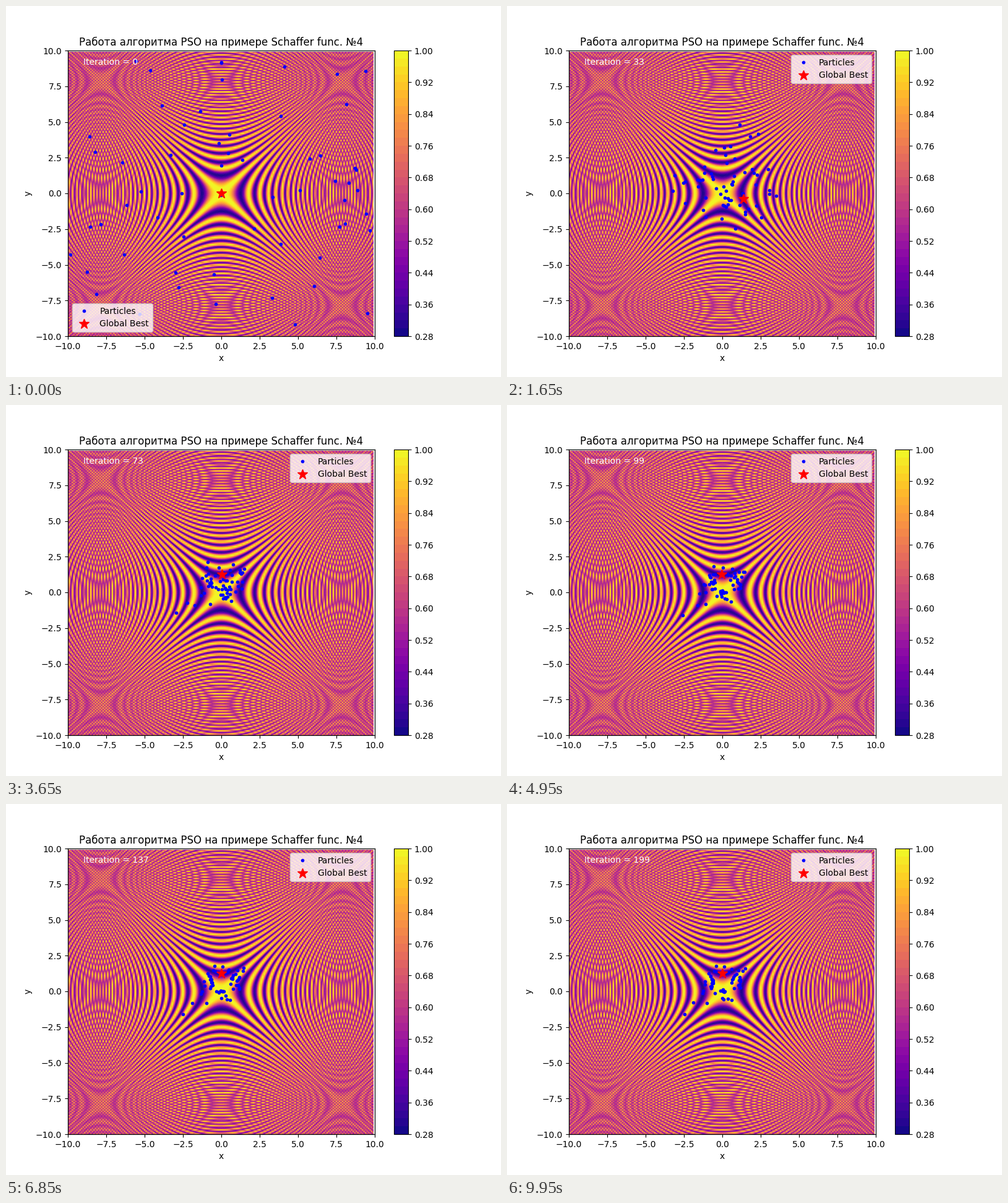
Recreate the animation shown at these times as a matplotlib script. Size 800 by 600 pixels, loop 10000 ms.

```python
import numpy as np
import matplotlib.pyplot as plt
from matplotlib.animation import FuncAnimation

plt.rcParams["font.family"] = "DejaVu Sans"

STEPS = 200
COUNT = 60
LEGEND_MOVE = 8  # iteration at which the upper right corner is free
AXES_BOX = (0.125, 0.11, 0.62, 0.77)
VALLEY = np.sqrt(np.pi / 2)  # distance of the deepest valley from the centre

# First iteration and place of each global best
BESTS = [(0, (0, 0)), (1, (1.36, -0.4)), (45, (0.03, 1.27)),
         (85, (-0.03, 1.25)), (105, (0, VALLEY))]


def schaffer4(x, y):
    top = np.cos(np.sin(np.abs(x**2 - y**2)))**2 - 0.5
    return 0.5 + top / (1 + 0.001 * (x**2 + y**2))**2


def draw_background(fig):
    """Render the static plot once and return it as an image."""
    ax = fig.add_subplot()
    axis = np.arange(-10, 10, 0.1)
    x, y = np.meshgrid(axis, axis)
    levels = np.linspace(0.28, 1, 37)
    field = ax.contourf(x, y, schaffer4(x, y), levels=levels, cmap="plasma")
    fig.colorbar(field, ax=ax, ticks=levels[::4], format="%.2f")
    ax.set(xlim=(-10, 10), ylim=(-10, 10), xlabel="x", ylabel="y",
           title="Работа алгоритма PSO на примере Schaffer func. №4")
    fig.canvas.draw()
    image = np.array(fig.canvas.buffer_rgba())
    fig.clear()
    return image


def valley_points(rng):
    """Personal bests, spread over the arms of the two inner valleys."""
    radius = VALLEY * rng.choice([1, np.sqrt(3)], COUNT, p=[0.75, 0.25])
    along = rng.normal(0, 0.5, COUNT)
    side = rng.choice([-1, 1], COUNT)
    arm = np.column_stack([side * radius * np.cosh(along),
                           radius * np.sinh(along)])
    upright = rng.random((COUNT, 1)) < 0.5
    return np.where(upright, arm[:, ::-1], arm)


rng = np.random.default_rng(4)
start = rng.uniform(-10, 10, (COUNT, 2))
# Each particle ends halfway between its own best and the global best.
home = (valley_points(rng) + BESTS[-1][1]) / 2
swing = rng.uniform(0.2, 0.45, (COUNT, 2))
speed = rng.uniform(0.4, 1.1, (COUNT, 2))
phase = rng.uniform(0, 2 * np.pi, (COUNT, 2))
reach = rng.exponential(0.06, (COUNT, 1))


def swarm(k):
    fade = np.exp(-(k / 35)**1.3)
    approach = (start - home) * fade * np.cos(swing * k)
    wobble = reach * (1 - fade) * np.sin(speed * k + phase)
    return home + approach + wobble


fig = plt.figure(figsize=(8, 6), dpi=100)
fig.figimage(draw_background(fig), zorder=-1)

ax = fig.add_axes(AXES_BOX)
ax.patch.set_visible(False)
ax.set(xlim=(-10, 10), ylim=(-10, 10), xticks=[], yticks=[])
dots, = ax.plot([], [], "bo", markersize=3, label="Particles")
star, = ax.plot([], [], "r*", markersize=12, label="Global Best")
label = ax.text(-9, 9, "", color="white")
legend = ax.legend(loc="lower left")


def update(k):
    dots.set_data(*swarm(k).T)
    x, y = [place for first, place in BESTS if first <= k][-1]
    star.set_data([x], [y])
    label.set_text(f"Iteration = {k}")
    legend.set_loc("lower left" if k < LEGEND_MOVE else "upper right")
    return dots, star, label, legend


anim = FuncAnimation(fig, update, frames=STEPS, interval=50,
                     init_func=lambda: update(0), repeat=True, repeat_delay=0)
plt.show()
```
